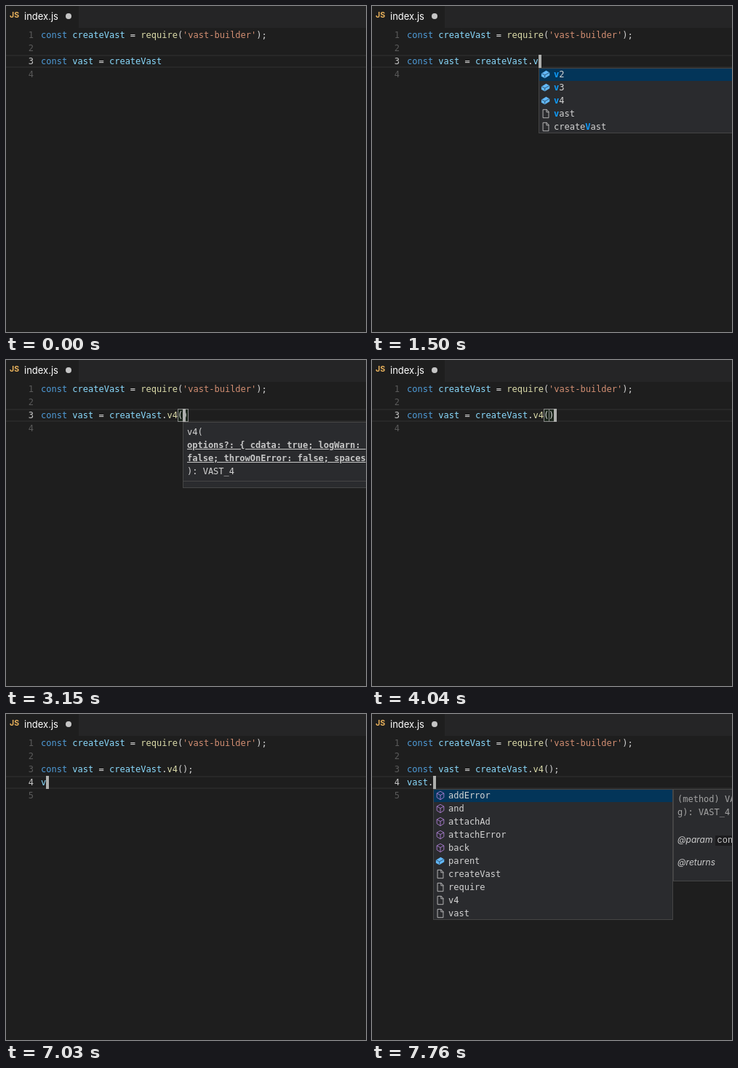
Recreate the animation shown at these times as an HTML page. Size 495 by 448 pixels, loop 8000 ms.

```html
<!DOCTYPE html>
<html lang="en">
<head>
<meta charset="utf-8">
<title>Editor</title>
<style>
  html, body { margin: 0; width: 100%; height: 100%; overflow: hidden; background: #1e1e1e; }
  #stage { position: absolute; inset: 0; overflow: hidden; color: #d4d4d4;
    font: 12px/18px "DejaVu Sans Mono", monospace; }
  #stage div { position: absolute; white-space: pre; box-sizing: border-box; }
  .bar { left: 100px; right: 0; height: 30px; background: #252526; }
  .js { left: 5px; top: 4px; font: bold 10.5px/18px Inter, sans-serif; color: #e9b25c; }
  .tab { left: 25px; top: 5px; font: 13px/18px Inter, sans-serif; color: #fff; }
  .dot { left: 82px; top: 10px; width: 8px; height: 8px; border-radius: 50%; background: #c5c5c5; }
  .active { left: 0; right: 0; height: 18px; border: solid #282828; border-width: 2px 0; }
  .num { left: 0; width: 38px; text-align: right; color: #5a5a5a; }
  .num.on { color: #c6c6c6; }
  .key { color: #4f9cd9; } .name { color: #8adafd; } .fn { color: #dcdcaa; } .str { color: #d28e72; }
  .cursor { width: 4px; height: 18px; background: #aeafad; }
  .paren { width: 8px; height: 18px; border: 1px solid #888; background: #0064001a; }
  .box { background: #2a2b2e; overflow: hidden; }
  .box::after { content: ""; position: absolute; inset: 0; border: 1px solid #454545; }
  .row { left: 0; width: 100%; height: 18px; padding-left: 21px; }
  .row.on { background: #033559; }
  .row b { color: #0f9bfb; }
  .row svg { position: absolute; left: 3px; top: 2px; }
  .docs { color: #a3a3a3; }
  .docs i { font: italic 12px/18px Inter, sans-serif; color: #ccc; }
  .docs code { font: 12px/14px "Liberation Mono", monospace; color: #ccc; background: #1c1c1e; padding: 0 3px; }
  u { font-weight: bold; color: #c8c8c8; }
</style>
</head>
<body>
<div id="stage"></div>
<script>
const CHAR = 7.224, LEFT = 48, LOOP = 8000;
const stage = document.getElementById('stage');

const path = (d, color, fill = 'none') => `<path d="${d}" stroke="${color}" fill="${fill}"/>`;
const brick = path('M1 6.5 8.5 2 14 5v4.5L6.5 14 1 11Z', 'none', '#62b8f8') +
  path('M1.5 6.5 6.5 9 13.5 5.2M6.5 9v4', '#2a4a66');
const icons = {
  field: brick,
  file: path('M3.5 1.5h6l3 3.500v9.500h-9zM9 1.500v4h4', '#c5c5c5'),
  word: path('M4 3.500h8q1.500 0 1.500 1.500v6q0 1.500-1.500 1.500H4q-1.500 0-1.500-1.500V5q0-1.500 1.500-1.500ZM5 6.500h6M5 9.500h6', '#c5c5c5'),
  variable: path('M4 3.500H1.500v9H4M12 3.500h2.500v9H12', '#c5c5c5') +
    `<g transform="translate(3.600 3.600) scale(.58)">${brick}</g>`,
  method: path('M8 1.500 13.500 4.500v6.500L8 14.500 2.500 11V4.500ZM2.500 4.500 8 7.500l5.500-3M8 7.500v7', '#b180d7')
};

const at = (x, y, cls, html = '', css = '') =>
  `<div class="${cls}" style="left:${x}px;top:${y}px;${css}">${html}</div>`;

const paint = code => code.replace(/'[^']*'|\w+/g, (w, i) => {
  const cls = w[0] === "'" ? 'str' : w === 'const' ? 'key' : code[i + w.length] === '(' ? 'fn' : 'name';
  return `<span class="${cls}">${w}</span>`;
});

// Each entry is "icon label"; brackets mark the matched letters.
function list(x, y, items, selected) {
  const rows = items.map((item, i) => {
    const [icon, label] = item.split(' ');
    const text = label.replace(/\[(\w+)\]/g, '<b>$1</b>');
    return at(0, i * 18, i === selected ? 'row on' : 'row',
      `<svg width="14" height="14" viewBox="0 0 16 16">${icons[icon]}</svg>${text}`);
  });
  return at(x, y, 'box', rows.join(''), `width:330px;height:${items.length * 18}px`);
}

const panel = (x, y, h, lines, cls = '') =>
  at(x, y, 'box ' + cls, lines.map(([top, html]) => at(6, top, '', html)).join(''), `width:500px;height:${h}px`);

const signature = () => panel(243, 85, 91, [
  [5, 'v4('],
  [23, '<u>options?: { cdata: true; logWarn: </u>'],
  [41, '<u>false; throwOnError: false; spaces</u>'],
  [59, '): VAST_4']
]) + at(244, 166, '', '', 'width:260px;height:1px;background:#454545');

const members = ['field v2', 'field v3', 'field v4', 'file createVast', 'file require', 'file vast'];
const versions = ['field [v]2', 'field [v]3', 'field [v]4', 'file [v]ast', 'file create[V]ast'];
const va = ['word [va]st', 'variable [va]r', 'variable [Va]lidityState', 'word create[Va]st',
  'variable [V]RDispl[a]y', 'variable [V]RDispl[a]yCapabilities', 'variable [V]RDispl[a]yEvent',
  'variable [V]RFr[a]meData', 'variable [V]RSt[a]geParameters', 'variable [V]ideoTr[a]ckList',
  'variable SVGPathSegLineto[V]ertical[A]bs', 'variable [V]REyeP[a]rameters'];
const vas = ['word [vas]t', 'variable [Va]lidity[S]tate', 'word create[Vas]t',
  'variable [V]RDi[s]pl[a]y', 'variable [V]RDi[s]pl[a]yCapabilities', 'variable [V]RDi[s]pl[a]yEvent',
  'variable [V]ideoTr[a]ckLi[s]t', 'variable SVGPathSegLineto[V]ertical[A]b[s]', 'variable [V]REyeP[a]rameter[s]'];
const vast = ['word [vast]', 'variable [Va]lidity[St]ate', 'word create[Vast]', 'variable [V]ideoTr[a]ckLi[st]'];
const methods = ['method addError', 'method and', 'method attachAd', 'method attachError', 'method back',
  'field parent', 'file createVast', 'file require', 'file v4', 'file vast'];

const hint = x => panel(x, 103, 36, [[5, 'const vast: VAST_4']], 'docs');
const help = () => panel(414, 103, 127, [
  [5, '(method) VAST_4.addError('], [23, 'g): VAST_4'],
  [61, '<i>@param</i><code style="margin-left:3px">content</code>'], [92, '<i>@returns</i>']
], 'docs');

// Every step changes some fields and keeps the rest.
const steps = [
  [0, { call: '', line: 3, typed: '', col: 23, glow: 0, parens: false, pop: null }],
  [450, { glow: .5 }],
  [600, { glow: 1 }],
  [900, { glow: .5 }],
  [1050, { call: '.', col: 24, glow: 1 }],
  [1200, { pop: () => list(221, 85, members, 0) }],
  [1500, { call: '.v', col: 25, pop: () => list(229, 85, versions, 0) }],
  [2100, { glow: .5, pop: () => list(229, 85, versions, 1) }],
  [2250, { glow: 0, pop: () => list(229, 85, versions, 2) }],
  [2700, { call: '.v4', col: 26, glow: 1, pop: null }],
  [3000, { call: '.v4()', col: 27, parens: true }],
  [3150, { pop: signature }],
  [3590, { glow: .5 }],
  [3740, { glow: 0 }],
  [3890, { col: 28, glow: 1 }],
  [4040, { pop: null }],
  [4340, { call: '.v4();', col: 29, parens: false }],
  [4940, { glow: .5 }],
  [5090, { glow: 0 }],
  [5530, { glow: .5 }],
  [5680, { glow: 1 }],
  [5980, { glow: .5 }],
  [6130, { glow: 0 }],
  [6430, { line: 4, col: 0, glow: 1 }],
  [7030, { typed: 'v', col: 1 }],
  [7180, { typed: 'va', col: 2, pop: () => list(62, 103, va, 0) + hint(392) }],
  [7320, { typed: 'vas', col: 3, pop: () => list(70, 103, vas, 0) + hint(400) }],
  [7460, { typed: 'vast', col: 4, pop: () => list(77, 103, vast, 0) + hint(407) }],
  [7610, { typed: 'vast.', col: 5, pop: null }],
  [7760, { pop: () => list(84, 103, methods, 0) + help() }]
];

const lineTop = n => 13 + 18 * n;
const colX = c => Math.round(LEFT + c * CHAR);

function render(s) {
  let html = '<div class="bar"></div><div class="js">JS</div><div class="tab">index.js</div><div class="dot"></div>';
  html += at(0, lineTop(s.line), 'active');
  for (let n = 1; n <= s.line + 1; n++) html += at(0, lineTop(n), n === s.line ? 'num on' : 'num', n);
  if (s.parens) html += at(colX(26), 67, 'paren') + at(colX(27), 67, 'paren');
  const code = ["const createVast = require('vast-builder');", '', 'const vast = createVast' + s.call, s.typed];
  code.forEach((text, i) => html += at(LEFT, lineTop(i + 1), '', paint(text)));
  html += at(colX(s.col), lineTop(s.line), 'cursor', '', `opacity:${s.glow}`);
  stage.innerHTML = html + (s.pop ? s.pop() : '');
}

const start = performance.now();
let shown = 0;
function frame() {
  const t = (performance.now() - start) % LOOP;
  const past = steps.filter(([time]) => time <= t);
  if (past.length !== shown) {
    shown = past.length;
    render(Object.assign({}, ...past.map(step => step[1])));
  }
  requestAnimationFrame(frame);
}
frame();
</script>
</body>
</html>
```
